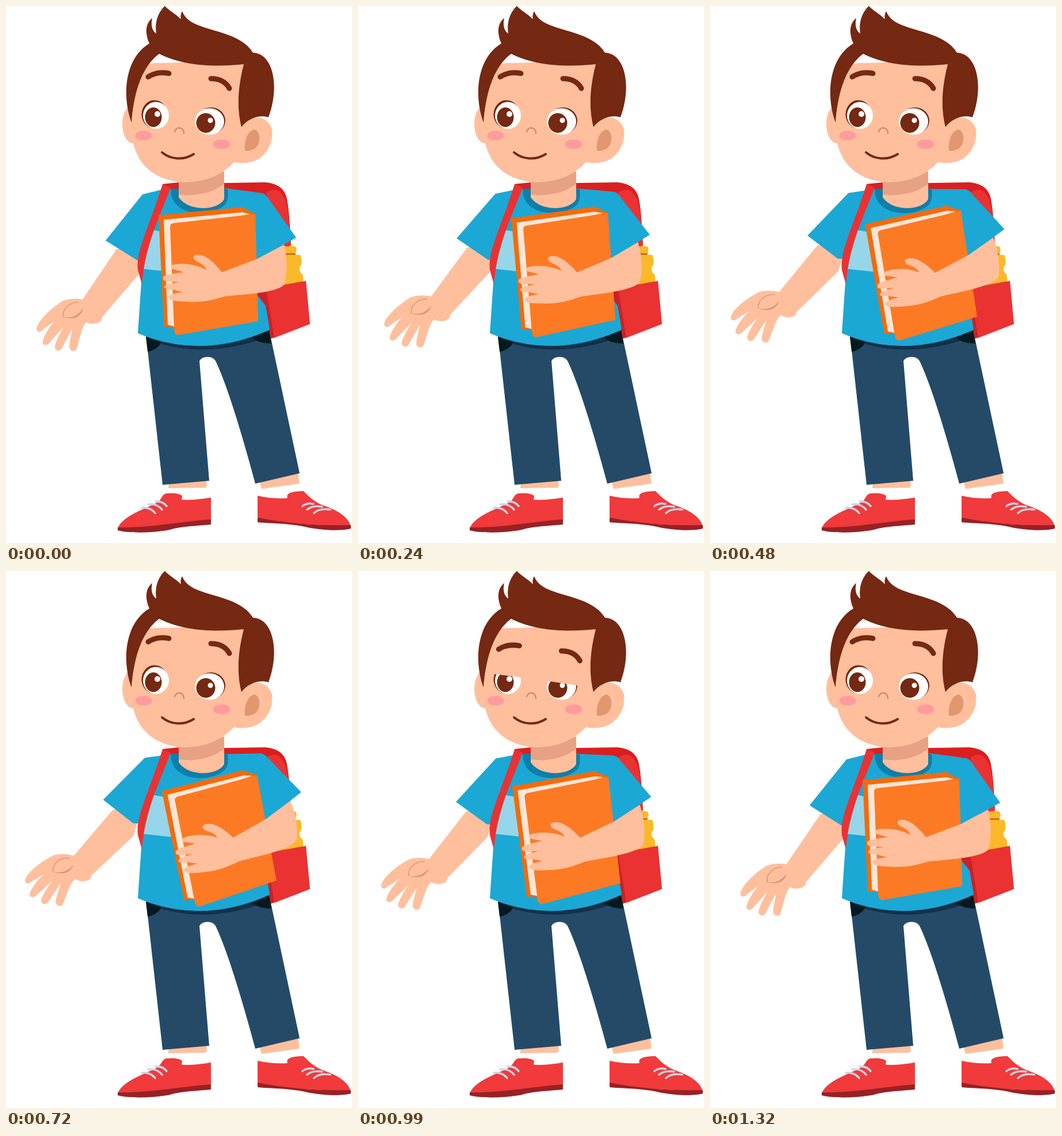
Recreate the animation shown at these times as an HTML page. Size 601 px wide and 932 px high, loop 1350 ms.

```html
<!DOCTYPE html>
<html lang="en">
<head>
<meta charset="utf-8">
<title>Schoolboy</title>
<style>
  html, body { margin: 0; width: 100%; height: 100%; overflow: hidden; background: #fff; }
  svg { display: block; width: 601px; height: 932px; }
  .skin { fill: #ffbf9d; }
  .hair { fill: #752812; }
  .blue { fill: #1ba8d5; }
  .red { fill: #ea3233; }
  .shoe { fill: #f03a3b; }
  .sole { fill: #982124; }
  .dark { fill: #d91f20; }
  .cheek { fill: #ff9b9d; }
  .white { fill: #fff; }
  .line { fill: none; stroke: #752812; stroke-linecap: round; }
  .lace { fill: none; stroke: #cdd3e4; stroke-width: 3.6; stroke-linecap: round; }
</style>
</head>
<body>
<svg viewBox="0 0 601 932">
  <g id="bag">
    <path class="dark" d="M272 309L450 306Q478 308 486 328Q492 345 495 416L440 430L380 330L272 330Z"/>
    <path class="red" d="M452 324Q462 317 472 320Q488 330 491 365L495 416L470 420Z"/>
    <path fill="#fbb829" d="M478 417H502Q506 420 504 426L502 432H511Q514 436 513 449Q507 456 512 463Q517 465 516 478L506 484L470 488V433Z"/>
    <path fill="#cf7410" d="M478 429H503V432H478Z"/>
    <path fill="#d5931f" d="M470 484Q500 482 513 478V483L470 489Z"/>
    <path fill="#cc2127" d="M430 490L470 486V574L458 578L440 560Z"/>
    <path class="red" d="M452 490L521 477L528 552L466 576Z"/>
  </g>

  <g id="legs">
    <path class="skin" d="M283 822H349L348 836L282 837ZM439 820L507 808L510 829L444 838Z"/>
    <path fill="#244a68" d="M243 570L272 831L353 824L336 616Q340 609 350 609Q360 609 364 616Q390 670 433 829L510 811L457 562Z"/>
    <path fill="#12304a" d="M244 578Q345 617 457 573V560H244Z"/>
    <path fill="#031a20" d="M243 574L270 584Q262 597 246 600ZM427 575Q436 585 461 586L457 563Z"/>
    <path class="shoe" d="M194 907C202 885 240 874 262 862C270 858 270 848 278 846Q298 844 306 850L305 857Q330 858 356 853V893L290 902Z"/>
    <path class="sole" d="M194 905C250 906 310 894 356 891V900C320 903 300 904 285 909C255 915 210 915 194 910Z"/>
    <path class="shoe" d="M437 850Q465 856 489 854C485 844 500 842 517 842C526 852 538 862 552 867C578 876 596 888 599 904L500 898L437 890Z"/>
    <path class="sole" d="M437 888C490 898 540 902 599 901V907C580 912 545 910 515 903C490 898 460 898 437 896Z"/>
    <path class="lace" d="M260 860Q272 859 279 868M247 865Q262 863 271 874M236 871Q250 869 259 880M515 868Q522 862 534 864M523 874Q533 866 549 869M535 880Q545 871 563 874"/>
  </g>

  <g id="leftArm">
    <path class="skin" d="M192 422L133 509Q114 506 98 512C78 525 56 545 53 560Q54 567 60 565L84 547C73 560 62 579 64 586Q68 591 74 586L100 557C91 573 83 590 85 594Q89 601 96 596L115 560C113 574 108 591 111 595Q115 601 122 597C129 577 130 560 139 549Q153 555 165 547L167 540L232 464L240 420Z"/>
    <path fill="none" stroke="#dba284" stroke-width="2" d="M100 541C96 527 110 514 126 514"/>
    <path fill="#d09a7c" d="M99 540C115 543 125 537 134 525C130 542 113 545 99 540Z"/>
    <path class="blue" d="M173 407L237 327L285 315V440L229 442Z"/>
  </g>

  <g id="torso">
    <path class="blue" d="M280 316L300 317H379L425 322L440 340L435 500L451 520L458 562Q340 615 229 568L235 480L240 420Z"/>
    <path fill="#97d6ea" d="M256 389L300 396V463L236 456Z"/>
    <path class="dark" d="M272 309L301 306V317L284 318Z"/>
    <path class="red" d="M272 309L286 315C270 360 242 410 236 483L229 458C225 425 250 380 272 309Z"/>
  </g>

  <g id="rightSleeve"><path class="blue" d="M380 316L446 325Q452 328 455 333L504 402L436 440L415 450L383 345Z"/></g>

  <g id="neck">
    <path fill="#107ea9" d="M286 317H300L378 316L385 318Q387 335 382 343C360 366 315 363 297 346Q286 335 286 317Z"/>
    <path class="skin" d="M300 280H379V335C368 356 316 357 300 332Z"/>
    <path fill="#e6a283" d="M300 300L379 288V309Q345 333 300 327Z"/>
  </g>

  <g id="head">
    <ellipse class="skin" cx="220" cy="205" rx="18" ry="33"/>
    <path class="skin" d="M225 100L425 95L408 255C390 285 355 306 310 306C255 304 216 270 218 205Z"/>
    <path class="skin" d="M408 207C425 187 455 190 462 214C466 250 438 280 396 271Z"/>
    <path fill="#df9870" d="M432 214C443 219 443 239 433 247Q425 252 415 251C413 237 418 217 432 214Z"/>
    <path class="hair" d="M218 202C202 160 204 92 249 65C241 48 242 30 254 21C251 34 254 43 261 48C258 28 264 11 276 0C283 8 294 13 304 23Q302 15 306 9Q310 20 321 27C350 45 407 45 429 81C464 82 476 139 456 193C440 188 420 195 409 210C399 172 405 132 413 101C372 105 314 107 266 83C236 105 222 150 218 202Z"/>
    <ellipse class="cheek" cx="239" cy="225" rx="14.5" ry="8.5"/>
    <ellipse class="cheek" cx="374.500" cy="240" rx="15" ry="8.5"/>
    <path fill="none" stroke="#d58b66" stroke-width="2.5" stroke-linecap="round" d="M293 218Q296 210 303 212Q309 214 309 221"/>
    <path class="line" stroke-width="4" d="M271 254C286 267 309 268 326 257"/>
    <ellipse class="hair" cx="258" cy="188" rx="22.500" ry="24.500"/>
    <ellipse class="white" cx="260.500" cy="190" rx="22.500" ry="23.500"/>
    <ellipse class="hair" cx="256" cy="193" rx="14.500" ry="17"/>
    <circle class="white" cx="263" cy="187.500" r="5"/>
    <ellipse class="hair" cx="356" cy="199" rx="25" ry="23"/>
    <ellipse class="white" cx="353.500" cy="200.500" rx="25.500" ry="23"/>
    <ellipse class="hair" cx="347" cy="203" rx="16.500" ry="17"/>
    <circle class="white" cx="355" cy="198.500" r="4.500"/>
    <path id="lids" class="skin" d="M232 132H288V163L232 156ZM325 142H385V177L325 168Z"/>
    <path id="brows" class="line" stroke-width="9" d="M247 123Q262 113 283 117M356 126C371 126 382 132 388 143"/>
  </g>

  <g id="rightArm">
    <path fill="#f56a0c" d="M265 363L410 349L433 361L430 400L295 558L274 556Z"/>
    <path fill="#fde6d6" d="M274 371L410 358L424 361L300 385L294 557L281 553Z"/>
    <path fill="#fd7a24" d="M285 383Q285 378 290 377L433 361L438 547L299 571Q292 571 292 561Z"/>
    <path class="skin" d="M436 439L375 462C362 445 345 429 330 432C322 434 326 441 333 444Q346 450 348 458C332 449 308 445 290 449C284 452 286 457 292 457L309 462C293 464 280 466 274 469C270 474 275 478 281 478L302 479C290 481 274 483 275 488C277 492 283 492 290 492L307 497C295 498 283 500 282 505C284 511 292 512 310 513C337 515 354 512 380 504C418 500 468 498 483 484C490 462 488 433 483 414Z"/>
  </g>
</svg>
<script>
const LOOP = 1350, STEP = 30;
const el = id => document.getElementById(id);
const set = (id, transform) => el(id).setAttribute('transform', transform);

function pose(ms) {
  const t = Math.floor(ms % LOOP / STEP) * STEP;
  const swing = (1 - Math.cos(2 * Math.PI * t / LOOP)) / 2;
  const hug = `rotate(${-8.9 * swing} 390 336)`;
  set('leftArm', `rotate(${6.2 * swing ** 0.8} 265 362)`);
  set('rightSleeve', hug);
  set('rightArm', hug);

  const phase = Math.min(1, Math.max(0, (t - 780) / 300));
  const blink = Math.sin(Math.PI * phase) ** 2;
  set('lids', `translate(0 ${34 * blink})`);
  set('brows', `translate(${-4 * blink} ${19.5 * blink})`);
}

const start = performance.now();
function tick() {
  pose(performance.now() - start);
  requestAnimationFrame(tick);
}
tick();
</script>
</body>
</html>
```
